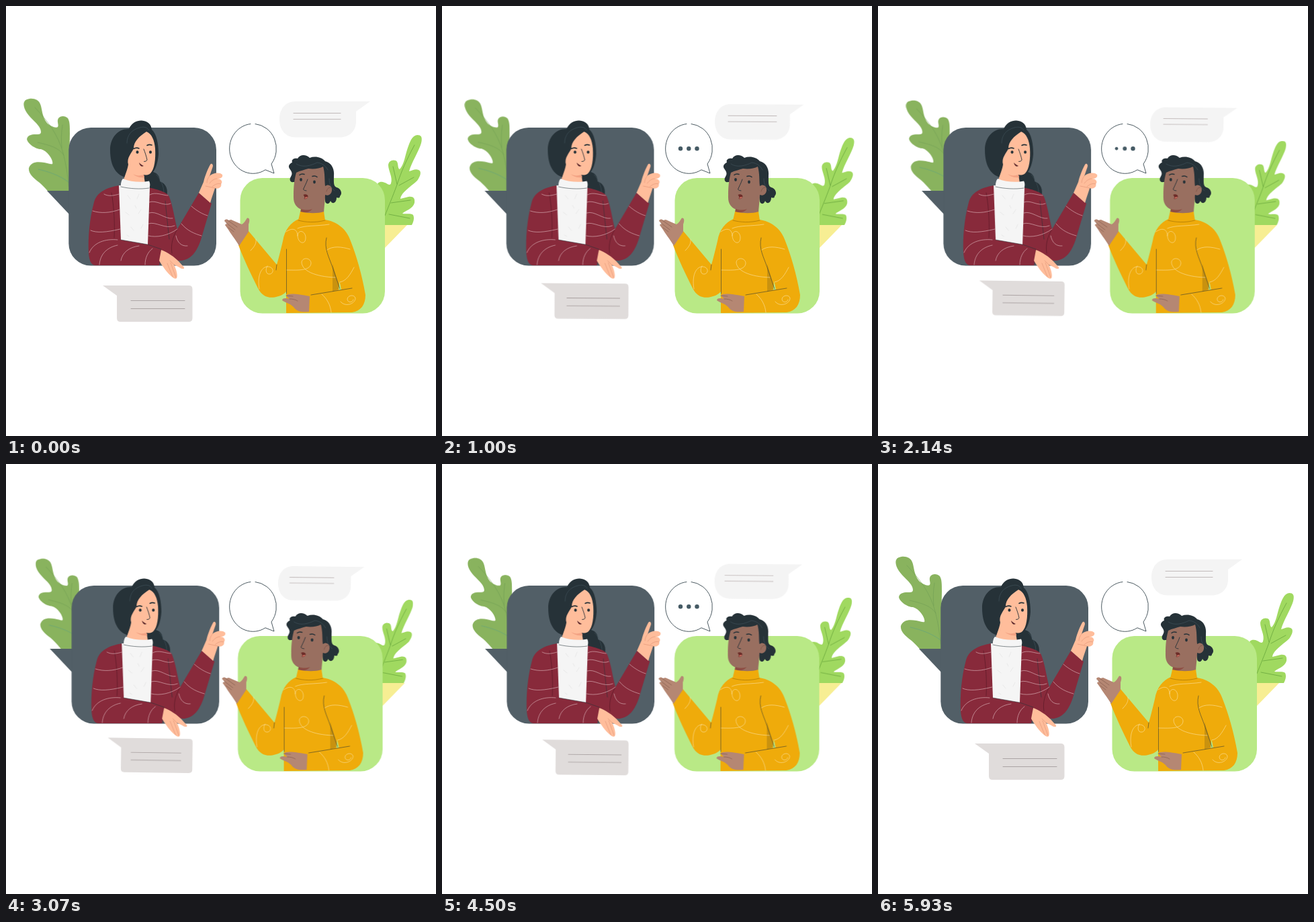
These frames come from a looping animation (640 by 640 pixels, 6000 ms). An HTML page:

```html
<!DOCTYPE html>
<html lang="en">
<head>
<meta charset="utf-8">
<title>Conversation</title>
<style>
  html, body { margin: 0; width: 100%; height: 100%; overflow: hidden; background: #fff; }
  svg { display: block; width: 100vw; height: 100vh; }

  /* One sway out and back; --to is the far pose. */
  .sway {
    animation: sway 6s infinite;
    animation-timing-function: linear(0, .16 9.5%, .2 11%, .6 21.7%, .67 23.8%, .84 33%, .95 43%, 1 50.5%, .89 64%, .67 75%, .35 87%, .06 96.5%, 0 98.8%, 0);
  }
  .card {
    animation-timing-function: linear(0, .3 9.5%, .84 23.8%, .94 34%, 1 50.5%, .92 64%, .73 75%, .3 87%, 0 98.8%, 0);
  }
  @keyframes sway { from { transform: none; } to { transform: var(--to); } }

  #fernL { --to: translate(19.3px, 11.4px) scale(.94); }
  #fernR { --to: translate(36.5px, 25.4px) scale(.92); }
  #noteTop { --to: translate(-2px, 8.5px) rotate(.6deg) scale(.95); transform-origin: 407px 169px; }
  #noteLow { --to: translate(0, -8.4px) rotate(.8deg) scale(.945); transform-origin: 278px 443px; }
  #woman { --to: translateX(4.3px); }
  #man { --to: translateX(-3.5px); }

  #rowsTop { transform-origin: 463px 0; animation: rowsTop 6s linear infinite; }
  #rowsLow { transform-origin: 226px 0; animation: rowsLow 6s linear infinite; }
  @keyframes rowsTop {
    0%, 98.8%, 100% { transform: translateX(0) scaleX(1); }
    9.5% { transform: translateX(1.5px) scaleX(1.13); }
    23.8% { transform: translateX(.4px) scaleX(.97); }
    51% { transform: translateX(-3.3px) scaleX(.985); }
    75% { transform: translateX(-3px) scaleX(1.06); }
    87% { transform: translateX(-5.5px) scaleX(.985); }
  }
  @keyframes rowsLow {
    0%, 9.5%, 98.8%, 100% { transform: translateX(0) scaleX(1); }
    23.8% { transform: translateX(-4px) scaleX(1.01); }
    51% { transform: translateX(-6px) scaleX(.98); }
    75% { transform: translateX(-.5px) scaleX(1.02); }
    87% { transform: translateX(-1.5px) scaleX(.98); }
  }

  .dot { transform-box: fill-box; transform-origin: center; animation: dot 3s linear infinite; animation-delay: calc(var(--i) * .12s - 3s); }
  @keyframes dot {
    0%, 2.2% { transform: scale(0); }
    22.2%, 66% { transform: scale(1); }
    86%, 100% { transform: scale(0); }
  }

  .ln { fill: none; stroke-width: .9; stroke-linecap: round; stroke-linejoin: round; }
  .thin { stroke-width: .55; }
  .bold { stroke-width: 1.6; }
  .ink { stroke: #263238; }
  .dark { fill: #263238; }
  .skinW { fill: #ffbd9b; }
  .skinM { fill: #996f60; }
  .handM { fill: #b58773; }
  .wool { fill: #882a3b; }
  .knit { fill: #efab0b; }
</style>
</head>
<body>
<svg viewBox="0 0 640 640">
  <defs>
    <clipPath id="cutL"><rect width="640" height="275"/></clipPath>
    <clipPath id="cutR"><rect width="640" height="326"/></clipPath>
  </defs>

  <!-- Message notes -->
  <g id="noteTop" class="sway">
    <path fill="#f4f4f4" d="M431 142H542L521 157V172C521 187 510 195.500 497 195.500H431C416 195.500 407 184 407 169C407 153 416 142 431 142Z"/>
    <path id="rowsTop" class="ln" stroke="#bdb5b5" d="M428 159.500H498M428 168.500H498"/>
  </g>
  <g id="noteLow" class="sway">
    <path fill="#e0dcdb" d="M144 416H272q5.500 0 5.500 5.500V464.500q0 5.500-5.500 5.500H170.500q-5.500 0-5.500-5.500V431Z"/>
    <path id="rowsLow" class="ln" stroke="#a59d9d" d="M186 438.500H266M186 450.500H266"/>
  </g>

  <!-- Plants -->
  <g clip-path="url(#cutL)">
    <g id="fernL" class="sway">
      <path fill="#89b35e" d="M78 296C70 284 60 272 50 263C39 255 33 248 34 241C37 232 46 231 57 233C63 234 67 236 69 235C71 231 63 216 52 213C44 213 32 205 31 198C32 191 40 191 47 191C52 191 53 189 51 183C48 175 37 168 31 159C25 150 25 142 30 139.500C38 136 48 138 51 146C54 153 53 164 61 174C66 179 74 182 77 180C79 176 75 172 78 167C81 163 88 163 92 167C95 172 95 178 95 190L94 240V296Z"/>
      <path class="ln thin" stroke="#6f9d55" d="M43 151C62 171 78 192 85 219C89 235 92 250 93 268M84 177C82 190 82 199 83 211M47 203C65 207 79 211 86 222"/>
      <path class="ln thin" stroke="#5aa085" d="M48 243C62 246 80 252 93 262"/>
    </g>
  </g>
  <g clip-path="url(#cutR)">
    <g id="fernR" class="sway">
      <path fill="#a0d960" d="M562 340L600 332C605 326 609 317 606 311C602 308 595 310 590 309C593 305 606 302 608 293C609 286 606 283 599 284L587 287C588 277 605 267 612 260C617 253 619 246 614 244C609 242 605 245 600 246C603 234 615 215 618 204C620 195 618 192 612 192C604 193 601 203 598 211C594 222 593 235 586 243C582 242 585 232 580 230C575 228 569 231 569 237C569 245 576 255 573 264C571 269 567 263 561 262C556 261 552 263 553 268C555 277 561 284 563 296Z"/>
      <path class="ln thin" stroke="#4f8f2c" d="M608 207C596 229 588 247 582 266C575 285 569 299 564 312M607 255L585 267M602 289L573 293M576 239L582 265M601 316L570 310"/>
    </g>
  </g>

  <!-- Woman -->
  <g id="woman" class="sway card">
    <path fill="#525f67" d="M61 275H95V311Z"/>
    <rect x="93.300" y="181" width="219.700" height="205.500" rx="33" fill="#525f67"/>
    <path class="dark" d="M183 183C187 173 196 170 202 170.500C211 171 216 176 217 184C224 190 227 205 227 220C226 235 222 243 219 247C226 249 229 254 229 261C238 264 242 273 239 284L215 280L180 256C165 252 155 240 155 214C155 195 168 182 183 183Z"/>
    <path class="skinW" d="M209 187C217 190 221 200 222 212C223 228 221 243 215 249C212 252 207 252 205 251L207 264L174 264C176 253 180 247 182 236C179 226 187 219 190 212C190 202 198 194 209 187Z"/>
    <path fill="#f3a384" d="M189 250C194 253 199 253 205 251L206 255C199 256 193 254 189 250Z"/>
    <path class="ln thin" stroke="#465962" d="M180 204C180 192 187 184 199 181C206 179 211 181 213 185M224 251C230 258 235 268 235 278"/>
    <ellipse class="dark" cx="195.500" cy="217.500" rx="2" ry="2.300"/>
    <ellipse class="dark" cx="215" cy="217.500" rx="2" ry="2.300"/>
    <path class="ln ink bold" d="M190 212.500Q194 210 198 212M210 207.500Q213 205.500 217 207"/>
    <path class="ln ink" d="M205 213C207 218 209 224 210 229Q209 232 205.500 231.500"/>
    <path fill="#5d2a2d" d="M198 233C199 238 202 240 205 238C203 237 201 236 198 233Z"/>

    <path class="wool" d="M170 267C148 270 135 278 131 292C124 318 122 345 123 368C124 380 127 386 134 386H228L232 364C240 372 248 379 260 379C275 378 284 366 290 348L306 294L287 278L255 332C251 318 249 300 243 284C241 279 234 275 212 270Z"/>
    <path fill="#f5f5f5" d="M168 267L214 270L211 355L171 348Z"/>
    <path class="ln thin" stroke="#dedede" d="M181 282l4 5M198 280l-3 7M178 307l5 4M201 303l-4 6M186 329l4 5M204 325l-3 6M180 341l3 2M192 297l2 4"/>
    <path fill="#f5f5f5" d="M174 257C186 262 202 263 213 260.500C215 264 214.500 269 213 272C200 273 184 272 171 269C170.500 264 172 259 174 257Z"/>
    <path class="ln ink thin" d="M171 269C184 272 200 273 213 271M171 348L211 355L231 362M237 290C239 310 241 330 243 347"/>
    <path class="ln thin" stroke="#4d1522" d="M157 278C161 300 162 325 161 345M231 363L229 385M255 332C248 344 245 355 247 368"/>
    <path class="ln thin" stroke="#ecd0d4" d="M146 280C153 284 161 282 168 280M129 305C141 309 155 308 169 303M126 334C135 338 149 337 170 332M124 367C130 352 148 346 166 348M139 385C140 369 151 359 166 356M171 379C173 367 183 359 198 357M207 385C207 375 211 366 218 361M214 281C222 276 234 282 241 282M213 292C224 288 234 299 245 294M213 308C224 304 237 318 248 316M212 324C223 320 237 333 251 327M212 342C224 345 241 342 255 332M253 342C255 352 261 358 270 357M261 324C270 335 281 339 291 342M276 298C284 305 293 310 300 312"/>
    <path class="skinW" d="M287 278L294 262C296 253 301 241 304 236C306 233 309 236 307.500 240L303 253C308 248 318 247 322 251C323 255 320 257 314 257C321 257 323 262 320 265C322 270 315 273 311 271C309 278 306 285 304 293Z"/>
    <path class="ln thin" stroke="#dd8f72" d="M303 253C300 257 299 260 299 263M314 257C309 257 305 261 303 264M320 265C315 263 310 266 307 269M297 268L311 271"/>
    <path class="skinW" d="M231 363C241 367 250 373 257 380L265 389C266 392 262 392 258 389L250 385C254 393 256 402 254 405C252 407 249 405 247 403C241 399 232 386 228 379Z"/>
    <path class="ln thin" stroke="#dd8f72" d="M240 383L248 403M245 382L253 404M250 385L244 379"/>
  </g>

  <!-- Man -->
  <g id="man" class="sway card">
    <path fill="#f7ee93" d="M562 326H597L562 362Z"/>
    <rect x="348.500" y="256" width="215.500" height="201.500" rx="33" fill="#b9e986"/>
    <path class="dark" d="M428 262C423 263 421 258 424 254C427 249 425 246 422 242C419 238 423 234 426 233C424 228 430 226 434 227C438 220 447 221 452 226C460 223 470 225 475 231C484 233 489 242 488 252C488 262 487 268 492 270C499 272 501 279 497 283C497 286 495 286 492 285C492 293 486 296 483 290C481 296 475 295 475 290L470 262Z"/>
    <path class="ln thin" stroke="#465962" d="M432 235C441 241 453 238 463 233C471 234 476 238 479 244M481 257C481 265 484 271 489 275"/>
    <path class="skinM" d="M432 248C438 245 444 244 450 242C458 243 467 242 472 239C475 249 474 260 475 268C480 264 486 268 485 275C484 281 479 283 475 281C475 291 473 300 473 310L438 309L440 303C432 300 428 294 428 285C428 274 428 262 432 248Z"/>
    <path fill="#8e4d43" d="M439 302C445 304 451 304 456 302C452 307 446 308 438 307Z"/>
    <path class="ln thin" stroke="#6f4a3f" d="M477 276C478 272 480 270 483 270"/>
    <ellipse class="dark" cx="439" cy="258.500" rx="1.900" ry="2.400"/>
    <ellipse class="dark" cx="459" cy="262" rx="1.900" ry="2.400"/>
    <path class="ln ink bold" d="M437 251.500Q440 249 444 250.500M456 253.500Q460 252 463 254.500"/>
    <path class="ln ink" d="M449 258C447 264 444 269 442.500 273Q444 275 447 275"/>
    <path fill="#6d2c28" d="M442.500 281C445 279.500 449 280 449.500 283C449.500 286 446 288 443.500 287C445 285 444 283 442.500 281Z"/>
    <path fill="#c4685c" d="M445 284.800C447 283.500 449 284 449 284.800C448 286.500 446 287.300 444.300 286.500Z"/>

    <path class="knit" d="M436 317C424 322 415 332 412 350C409 362 406 375 403 385L361 335L346 356C353 375 365 400 375 420C381 432 390 435 400 433.500C408 432 414 429 417 425V457L515 456C528 454 535 445 535 430C530 400 521 370 513 350C507 331 491 320 474 318Z"/>
    <path fill="#c9920f" d="M486 384L497 421L486 425Z"/>
    <path fill="#b9e986" d="M496.500 410L499 422L495 422.500Z"/>
    <path class="knit" d="M438 306C450 309 465 309 473 306L475 319C460 323 446 322 435 319Z"/>
    <path class="ln thin" stroke="#8f6306" d="M435 319C446 322 460 323 475 319"/>
    <path class="ln ink thin" d="M477 345C473 361 481 374 486 389L497 421M454 430L515 420M417.500 362V428M403 385L402 393"/>
    <path class="ln thin" stroke="#fdeab8" d="M417 336C428 328 434 334 434 342C435 354 446 356 446 345C446 335 435 331 434 342M434 331C445 326 462 328 481 325M418 393C431 393 453 395 454 383C454 375 442 373 440 381C440 394 460 403 490 404M478 363C486 357 499 358 512 362M497 411C507 409 512 400 518 389M364 364C370 358 373 353 372 347M377 421C374 405 378 390 388 388C398 387 400 397 393 399C386 400 386 391 389 387M470 429C478 436 483 445 484 456M498 440C505 449 520 443 520 435C519 429 509 430 508 436C508 442 516 442 517 437"/>
    <path class="handM" d="M347 357C340 345 335 340 331 333L326 326C327 324 329 324 330 325L325 320C326 317 329 317 331 319L335 318L351 325C355 323 357 318 359 315.500C363 315 363 320 361 325L361 336Z"/>
    <path class="ln thin" stroke="#7a5446" d="M330 319L344 329M328 323L341 333M331 330L339 336"/>
    <path class="handM" d="M452 432L451 455C440 456 433 455 428 448C422 442 414 441 411 438C412 434 417 435 422 436L417 431C420 427 432 428 452 432Z"/>
    <path class="ln thin" stroke="#7a5446" d="M422 436C427 436 431 437 434 439M417 431L427 432"/>
  </g>

  <!-- Typing bubble -->
  <path class="ln" stroke="#37474f" d="M371 175.500A35 37 0 0 1 395 235L399 249L386 243.800A35 37 0 1 1 364 175.500"/>
  <g fill="#455a64">
    <circle class="dot" style="--i:0" cx="355" cy="212.200" r="3.200"/>
    <circle class="dot" style="--i:1" cx="367.300" cy="212.200" r="3.200"/>
    <circle class="dot" style="--i:2" cx="379.500" cy="212.200" r="3.200"/>
  </g>
</svg>
</body>
</html>
```
